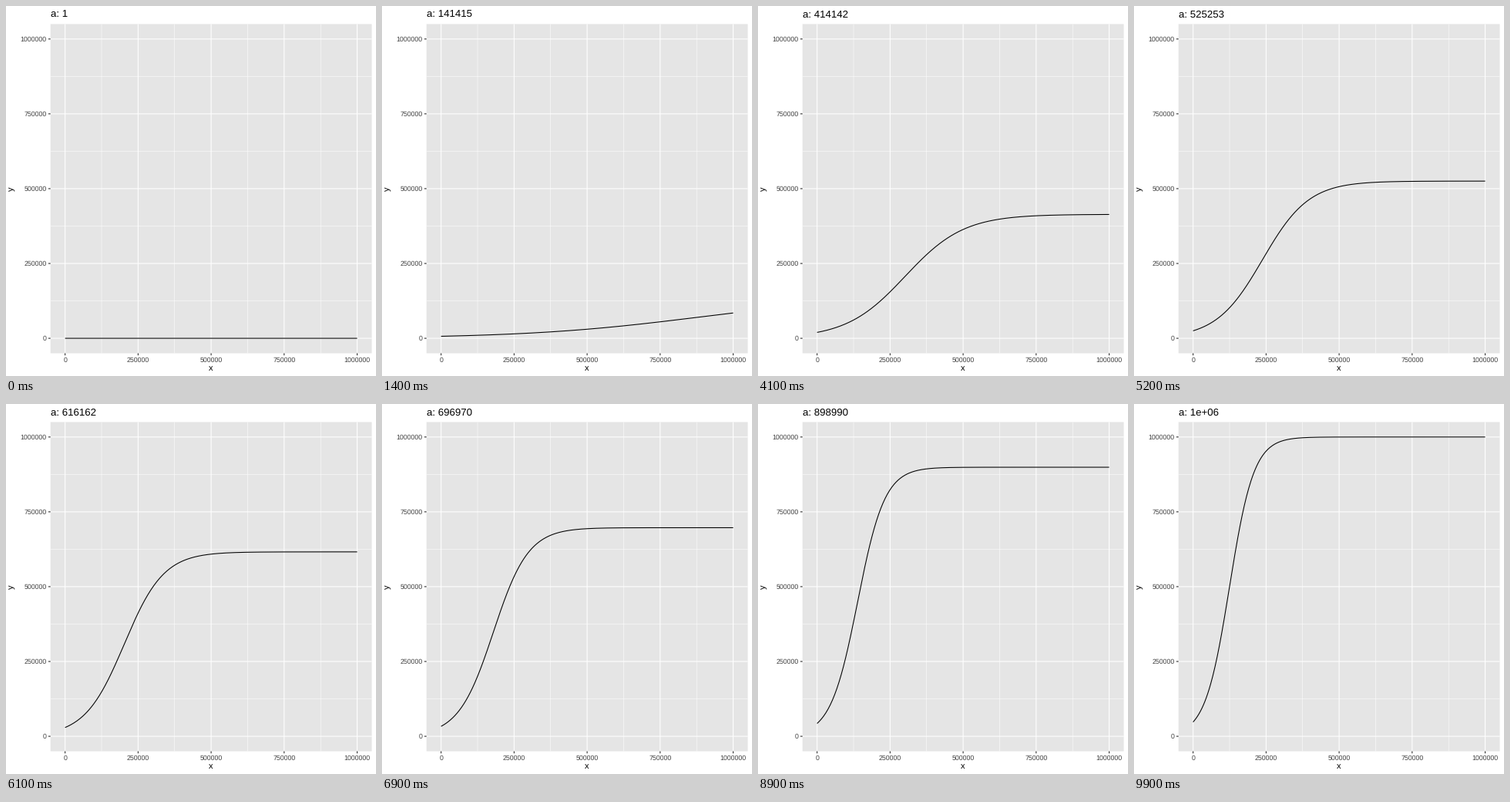
Recreate the animation shown at these times as a matplotlib script. Size 480x480 px, loop 10000 ms.

```python
import matplotlib.pyplot as plt
import numpy as np
from matplotlib.animation import FuncAnimation
from matplotlib.patches import Rectangle

SIZE, DPI = 480, 96
PT = 72 / DPI  # points per pixel
FRAMES = 100
TOP = 1_000_000

# panel edges in pixels, y pointing down
LEFT, RIGHT, UPPER, LOWER = 57.7, 474.5, 23.4, 450.5
PAD = 0.05 / 1.1  # share of the panel left free on each side

plt.rcParams["font.family"] = "Liberation Sans"
plt.rcParams["text.hinting"] = "none"


def px(x):
    return LEFT + (RIGHT - LEFT) * (PAD + x / TOP / 1.1)


def py(y):
    return LOWER - (LOWER - UPPER) * (PAD + y / TOP / 1.1)


def logistic(x, a):
    return a / (1 + 20 * np.exp(-2.4e-11 * a * x))


fig = plt.figure(figsize=(SIZE / DPI, SIZE / DPI), dpi=DPI, facecolor="white")
ax = fig.add_axes([0, 0, 1, 1])
ax.set(xlim=(0, SIZE), ylim=(SIZE, 0))
ax.axis("off")


def line(xs, ys, color, width):
    return ax.plot(xs, ys, color=color, lw=width * PT, snap=False,
                   solid_capstyle="butt")[0]


def label(x, y, text, size, color="black", **kw):
    return ax.text(x, y, text, fontsize=size * PT, color=color, **kw)


ax.add_patch(Rectangle((LEFT, UPPER), RIGHT - LEFT, LOWER - UPPER,
                       fc="#e5e5e5", ec="none", snap=False))

for v in range(TOP // 8, TOP, TOP // 4):
    line([LEFT, RIGHT], [py(v)] * 2, "white", 0.53)
    line([px(v)] * 2, [UPPER, LOWER], "white", 0.53)

for v in range(0, TOP + 1, TOP // 4):
    line([LEFT, RIGHT], [py(v)] * 2, "white", 1.07)
    line([px(v)] * 2, [UPPER, LOWER], "white", 1.07)
    line([LEFT - 2.75, LEFT], [py(v)] * 2, "#262626", 1.07)
    line([px(v)] * 2, [LOWER, LOWER + 2.75], "#262626", 1.07)
    label(px(v), LOWER + 11.4, str(v), 8.8, "#404040", ha="center", va="baseline")
    label(LEFT - 5, py(v) + 3.2, str(v), 8.8, "#404040", ha="right", va="baseline")

label(px(TOP / 2), 473, "x", 11, ha="center", va="baseline")
label(8, py(TOP / 2), "y", 11, ha="center", va="center", rotation=90)

title = label(LEFT, 15, "", 13.2, ha="left", va="baseline")
xs = np.linspace(1, TOP, 400)
curve = line(px(xs), py(0 * xs), "black", 1.07)


def update(i):
    a = 1 + (TOP - 1) * i // (FRAMES - 1)
    title.set_text("a: 1e+06" if a == TOP else f"a: {a}")
    curve.set_ydata(py(logistic(xs, a)))
    return title, curve


anim = FuncAnimation(fig, update, frames=FRAMES, interval=100,
                     init_func=lambda: update(0), repeat=True, repeat_delay=0)
plt.show()
```
